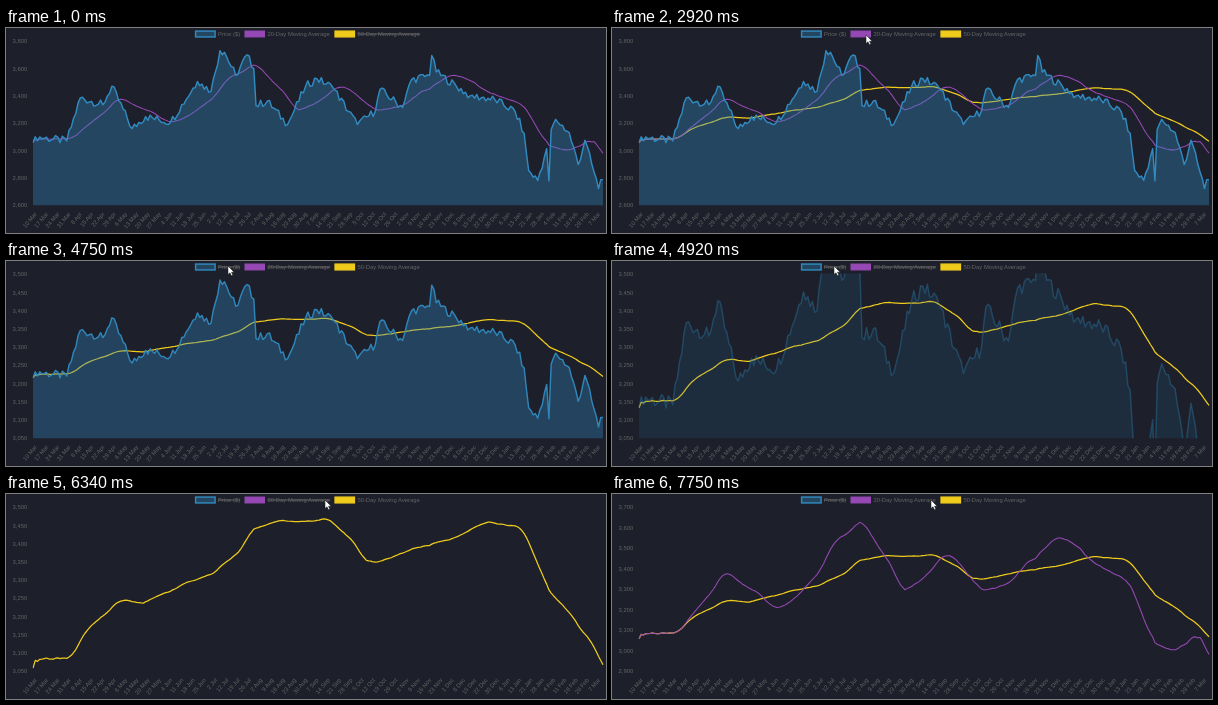
Animation, 600 px wide and 205 px high, one loop 8000 ms. Source, as an HTML page:

```html
<!DOCTYPE html>
<html lang="en">
<head>
<meta charset="utf-8">
<title>Price chart with moving averages</title>
<style>
  html, body { margin: 0; width: 100%; height: 100%; overflow: hidden; background: #1d1f2a; }
  svg { display: block; width: 600px; height: 205px; }
  text { font: 5.86px "Liberation Sans", Arial, sans-serif; fill: #666; }
  .y text, .x text { text-anchor: end; }
  .line { fill: none; stroke-linejoin: round; }
</style>
</head>
<body>
<svg viewBox="0 0 600 205" xmlns="http://www.w3.org/2000/svg">
  <clipPath id="area"><rect x="26.5" y="12.6" width="571.5" height="164.6"/></clipPath>
  <g id="axes"></g>
  <g id="plot" clip-path="url(#area)"></g>
  <g id="legend"></g>
  <path id="cursor" d="M0 0V8.6L2 6.8L3.4 9.8L4.9 9.1L3.5 6.2H6.2Z"
        fill="#fff" stroke="#111" stroke-width=".5"/>
</svg>
<script>
const LOOP = 8000, FPS = 12, FADE = 1000;
const LEFT = 27, RIGHT = 597, TOP = 13.3, BOTTOM = 177;
const DAYS = 254, JITTER = 30;

// Turning points of the price: [trading day, close].
const turns = [
  [0, 3058], [1, 3100], [15, 3070], [21, 3385], [31, 3335], [35, 3471], [44, 3160],
  [50, 3248], [61, 3205], [73, 3505], [79, 3433], [83, 3731], [85, 3719], [90, 3550],
  [95, 3700], [98, 3600], [99, 3328], [104, 3362], [113, 3190], [121, 3471], [126, 3526],
  [133, 3463], [144, 3190], [152, 3290], [154, 3447], [164, 3315], [168, 3519], [176, 3549],
  [177, 3696], [179, 3575], [194, 3400], [205, 3373], [214, 3285], [218, 3126], [220, 2853],
  [224, 2780], [228, 3012], [229, 2777], [230, 3153], [232, 3228], [238, 3130], [242, 2897],
  [245, 3075], [251, 2720], [252, 2786], [253, 2786]
];

const byId = id => document.getElementById(id);
const clamp = p => Math.min(1, Math.max(0, p));
const lerp = (a, b, p) => a + (b - a) * p;
const outQuad = p => 1 - (1 - p) ** 2;
const outQuart = p => 1 - (1 - clamp(p)) ** 4;
const smooth = p => p * p * (3 - 2 * p);
const xOf = day => lerp(LEFT, RIGHT, day / (DAYS - 1));
const yOf = (v, s) => lerp(BOTTOM, TOP, (v - s.lo) / (s.hi - s.lo));

// Repeatable noise from -1 to 1.
function noise(i) {
  const n = Math.sin(i * 12.9898) * 43758.5453;
  return 2 * (n - Math.floor(n)) - 1;
}

// Straight runs between turning points, with daily jitter in between.
function makePrice() {
  let k = 0;
  return Array.from({ length: DAYS }, (_, day) => {
    if (day > turns[k + 1][0]) k++;
    const [d0, v0] = turns[k], [d1, v1] = turns[k + 1];
    const jitter = day === d0 || day === d1 ? 0 : JITTER * noise(day);
    return lerp(v0, v1, (day - d0) / (d1 - d0)) + jitter;
  });
}

const average = (list, n) => list.map((_, i) => {
  const part = list.slice(Math.max(0, i - n + 1), i + 1);
  return part.reduce((a, b) => a + b) / part.length;
});

const price = makePrice();
const series = [
  { name: 'Price ($)', data: price, rgb: [48, 138, 192], fill: .36, width: 1.46,
    boxX: 189.6, textWidth: 22.1, flips: [4740], shown: true },
  { name: '20-Day Moving Average', data: average(price, 20), rgb: [150, 72, 180], width: 1.05,
    boxX: 239, textWidth: 62.7, flips: [3406, 6740], shown: true },
  { name: '50-Day Moving Average', data: average(price, 50), rgb: [239, 203, 28], width: 1.25,
    boxX: 329, textWidth: 62.7, flips: [1908], shown: false }
];
const scales = [
  { at: -FADE, lo: 2600, hi: 3800, step: 200 },
  { at: 4740, lo: 3050, hi: 3500, step: 50 },
  { at: 6740, lo: 2900, hi: 3700, step: 100 }
];
const moves = [
  { from: 400, to: 750, a: [612, 55], b: [499, 45], ease: outQuad },
  { from: 833, to: 1583, a: [499, 45], b: [381, 5] },
  { from: 2250, to: 2750, a: [381, 5], b: [254, 7] },
  { from: 4167, to: 4417, a: [254, 7], b: [222, 5] },
  { from: 5917, to: 6333, a: [222, 5], b: [319, 6] }
];

function add(parent, tag, attrs = {}, text = '') {
  const el = document.createElementNS('http://www.w3.org/2000/svg', tag);
  for (const k in attrs) el.setAttribute(k, attrs[k]);
  el.textContent = text;
  return parent.appendChild(el);
}

function buildAxes() {
  const axes = byId('axes');
  for (const s of scales) {
    s.el = add(axes, 'g', { class: 'y' });
    for (let v = s.lo; v <= s.hi; v += s.step)
      add(s.el, 'text', { x: 21.2, y: yOf(v, s) + 2.1 }, v.toLocaleString('en-US'));
  }
  // Every fifth trading day, skipping weekends and market holidays.
  const months = 'Jan Feb Mar Apr May Jun Jul Aug Sep Oct Nov Dec'.split(' ');
  const closed = ['2 Apr', '31 May', '5 Jul', '6 Sep', '25 Nov', '24 Dec', '17 Jan', '21 Feb'];
  const xs = add(axes, 'g', { class: 'x' });
  const date = new Date(2021, 2, 10);
  for (let i = 0; i < DAYS; date.setDate(date.getDate() + 1)) {
    const label = date.getDate() + ' ' + months[date.getMonth()];
    if (date.getDay() % 6 === 0 || closed.includes(label)) continue;
    if (i % 5 === 0)
      add(xs, 'text', { y: 2.1, transform: `translate(${xOf(i) + 2.7} 184.8) rotate(-50)` }, label);
    i++;
  }
}

function buildSeries() {
  const plot = byId('plot'), legend = byId('legend');
  for (const s of [...series].reverse()) {
    if (s.fill) s.area = add(plot, 'path');
    s.line = add(plot, 'path', { class: 'line', 'stroke-width': s.width });
  }
  for (const s of series) {
    const color = `rgb(${s.rgb})`, textX = s.boxX + 22.4;
    add(legend, 'rect', { x: s.boxX, y: 3.07, width: 19.5, height: 5.86, fill: color,
      'fill-opacity': s.fill || 1, stroke: color, 'stroke-width': s.width });
    add(legend, 'text', { x: textX, y: 8.1 }, s.name);
    s.strike = add(legend, 'path', { d: `M${textX} 6h${s.textWidth}`, stroke: '#666', 'stroke-width': .98 });
  }
}

// Shown state and opacity of one series.
function visibility(s, t) {
  const past = s.flips.filter(at => at <= t);
  const shown = s.shown !== (past.length % 2 === 1);
  const p = past.length ? outQuart((t - past[past.length - 1]) / FADE) : 1;
  return { shown, alpha: shown ? p : 1 - p };
}

function draw(t) {
  let n = scales.length - 1;
  while (scales[n].at > t) n--;
  const now = scales[n], before = scales[Math.max(0, n - 1)];
  const p = outQuart((t - now.at) / FADE);
  const y = v => lerp(yOf(v, before), yOf(v, now), p);
  for (const s of scales) s.el.style.display = s === now ? '' : 'none';

  for (const s of series) {
    const { shown, alpha } = visibility(s, t);
    const color = `rgb(${s.rgb.map(c => Math.round(c * alpha ** .25))})`;
    const d = 'M' + s.data.map((v, i) => xOf(i).toFixed(2) + ' ' + y(v).toFixed(2)).join('L');
    s.line.setAttribute('d', d);
    s.line.setAttribute('stroke', color);
    s.line.setAttribute('stroke-opacity', alpha);
    if (s.area) {
      s.area.setAttribute('d', `${d}V600H${LEFT}Z`);
      s.area.setAttribute('fill', color);
      s.area.setAttribute('fill-opacity', alpha * s.fill);
    }
    s.strike.style.display = shown ? 'none' : '';
  }

  const m = moves.filter(k => k.from <= t).pop() || moves[0];
  const q = (m.ease || smooth)(clamp((t - m.from) / (m.to - m.from)));
  byId('cursor').setAttribute('transform',
    `translate(${lerp(m.a[0], m.b[0], q)} ${lerp(m.a[1], m.b[1], q)})`);
}

buildAxes();
buildSeries();
draw(0);
const start = performance.now();
function tick() {
  const t = (performance.now() - start) % LOOP;
  draw(Math.floor((t + 4) * FPS / 1000) * 1000 / FPS);
  requestAnimationFrame(tick);
}
requestAnimationFrame(tick);
</script>
</body>
</html>
```
